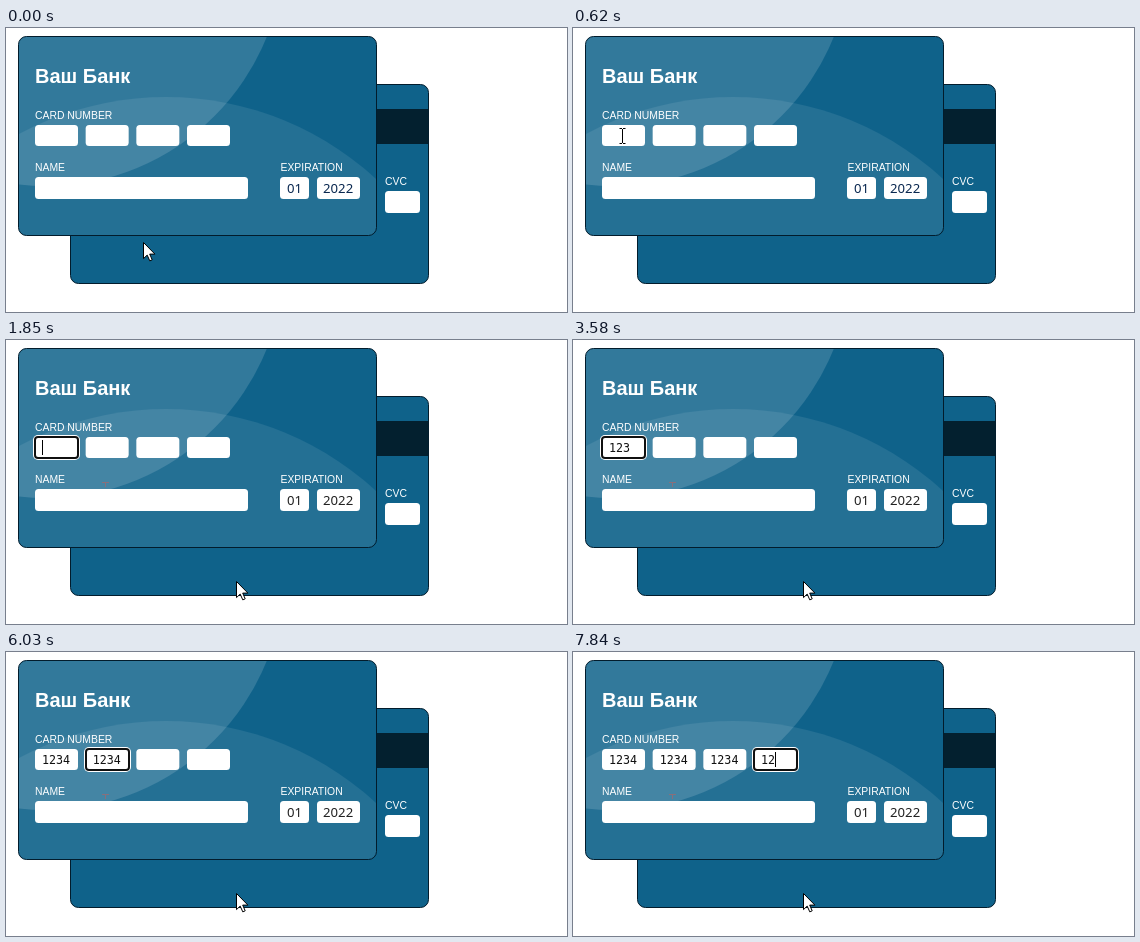
An HTML page for the animation above (8000 ms loop, 561 by 284 pixels).

```html
<!DOCTYPE html>
<html lang="ru">
<head>
<meta charset="utf-8">
<title>Card form</title>
<style>
  html, body { margin: 0; width: 100%; height: 100%; overflow: hidden; background: #fff; }
  svg { display: block; }
  text { white-space: pre; }
  .title { font: bold 20px "Liberation Sans", Arial, sans-serif; fill: #fff; }
  .label { font: 10.4px "Liberation Sans", Arial, sans-serif; fill: #fff; }
  .digits { font: 11.66px "DejaVu Sans Mono", monospace; fill: #111; }
  .date { font: 13.2px "Noto Sans", "Open Sans", sans-serif; }
  .card { fill: #0f628a; stroke: #021c2c; }
</style>
</head>
<body>
<svg id="stage" width="561" height="284" viewBox="0 0 561 284">
  <defs>
    <clipPath id="front"><rect x="13" y="9" width="357" height="198" rx="7.5"/></clipPath>
  </defs>

  <rect class="card" x="64.5" y="56.5" width="358" height="199" rx="8"/>
  <rect x="65" y="81" width="357" height="35" fill="#03202f"/>
  <text class="label" x="379" y="157">CVC</text>

  <rect class="card" x="12.5" y="8.5" width="358" height="199" rx="8"/>
  <g clip-path="url(#front)" fill="#fff">
    <circle cx="40" cy="-80" r="238" fill-opacity=".145"/>
    <circle cx="160" cy="379" r="310" fill-opacity=".085"/>
  </g>
  <text class="title" x="29" y="55">Ваш Банк</text>
  <text class="label" x="29" y="91">CARD NUMBER</text>
  <text class="label" x="29" y="143">NAME</text>
  <text class="label" x="274.5" y="143">EXPIRATION</text>

  <g id="fields" fill="#fff"></g>
  <g id="ring">
    <rect x="-2" y="95" width="47" height="25" rx="5" fill="#fff"/>
    <rect x="-1" y="96" width="45" height="23" rx="4" fill="#101010"/>
    <rect x="1" y="98" width="41" height="19" rx="2" fill="#fff"/>
  </g>
  <g id="dates">
    <text class="date" x="281" y="165">01</text>
    <text class="date" x="317" y="165">2022</text>
  </g>
  <g id="numbers"></g>
  <rect id="caret" y="100" width="1" height="15" fill="#000"/>

  <path id="trail" d="M96 142.5h7M99.5 143v4" fill="none" stroke="#a0686e" stroke-opacity=".75"/>
  <path id="arrow" d="M.5 .5V16.6L4.2 13.1 6.8 18.9 9.2 17.8 6.7 12.1H11.9Z" fill="#fff" stroke="#000"/>
  <path id="beam" d="M-3 -7.5h2.5M.5 -7.5H3M-.0 -7V7M-3 7.5h2.5M.5 7.5H3" fill="none" stroke="#000"/>
</svg>
<script>
const LOOP = 8000;
const GROUP = 4;
const CHAR_WIDTH = 7.02;
const ARROW = 0, BEAM = 1;

// time, x, y, shape
const pointer = [
  [0, 137, 214, ARROW],
  [200, 135, 207, ARROW],
  [270, 129, 195, ARROW],
  [340, 117, 178, ARROW],
  [410, 98, 158, BEAM],
  [480, 77, 137, ARROW],
  [550, 57, 115, BEAM],
  [620, 49.5, 108, BEAM],
  [1230, 99.5, 150, BEAM],
  [1300, 223, 248, ARROW],
  [1370, 231, 256, ARROW],
  [1440, 231, 253, ARROW],
  [1510, 230, 247, ARROW],
  [1580, 230, 242, ARROW],
  [1780, 230, 241, ARROW]
];

// time, digits typed, caret visible
const typing = [
  [0, -1, 0],
  [750, 0, 1], [1300, 0, 0], [1850, 0, 1], [2380, 0, 0],
  [2510, 1, 1], [2770, 2, 1], [3030, 3, 1], [3580, 3, 0],
  [3710, 4, 1], [4240, 4, 0],
  [4570, 5, 1], [4900, 6, 1], [5170, 7, 1], [5500, 8, 1], [6030, 8, 0],
  [6100, 9, 1], [6380, 10, 1], [6650, 11, 1], [6980, 12, 1], [7510, 12, 0],
  [7580, 13, 1], [7840, 14, 1]
];

const $ = id => document.getElementById(id);

function add(parent, tag, attrs) {
  const node = document.createElementNS("http://www.w3.org/2000/svg", tag);
  for (const key in attrs) node.setAttribute(key, attrs[key]);
  return parent.appendChild(node);
}

const show = (node, on) => node.setAttribute("visibility", on ? "visible" : "hidden");
const moveTo = (node, x, y) => node.setAttribute("transform", `translate(${x} ${y})`);
const stepAt = (steps, t) => steps.findLast(step => step[0] <= t);
const groupX = i => 29 + i * 152 / 3;

function field(x, y, width, height = 22) {
  add($("fields"), "rect", { x, y, width, height, rx: 3.5 });
}

const numbers = Array.from({ length: 4 }, (_, i) => {
  field(groupX(i), 97, 43, 21);
  return add($("numbers"), "text", { class: "digits", x: groupX(i) + 7, y: 112 });
});
field(29, 149, 213);
field(274, 149, 29);
field(311, 149, 43);
field(379, 163, 35);

function draw(t) {
  const [, x, y, shape] = stepAt(pointer, t);
  show($("arrow"), shape === ARROW);
  show($("beam"), shape === BEAM);
  moveTo($(shape === BEAM ? "beam" : "arrow"), x, y);
  show($("trail"), t >= 1300);

  const [, typed, caretOn] = stepAt(typing, t);
  const focused = typed >= 0;
  const active = Math.max(0, Math.ceil(typed / GROUP) - 1);
  const activeLength = Math.max(0, typed - active * GROUP);
  numbers.forEach((node, i) => {
    const length = Math.min(GROUP, Math.max(0, typed - i * GROUP));
    node.textContent = "1234".slice(0, length);
  });
  show($("ring"), focused);
  moveTo($("ring"), Math.round(groupX(active)), 0);
  show($("caret"), caretOn);
  $("caret").setAttribute("x", Math.floor(groupX(active) + 7 + CHAR_WIDTH * activeLength));
  $("dates").setAttribute("fill", focused ? "#222" : "#0a2850");
}

const start = performance.now();
function tick() {
  draw((performance.now() - start) % LOOP);
  requestAnimationFrame(tick);
}
tick();
</script>
</body>
</html>
```
